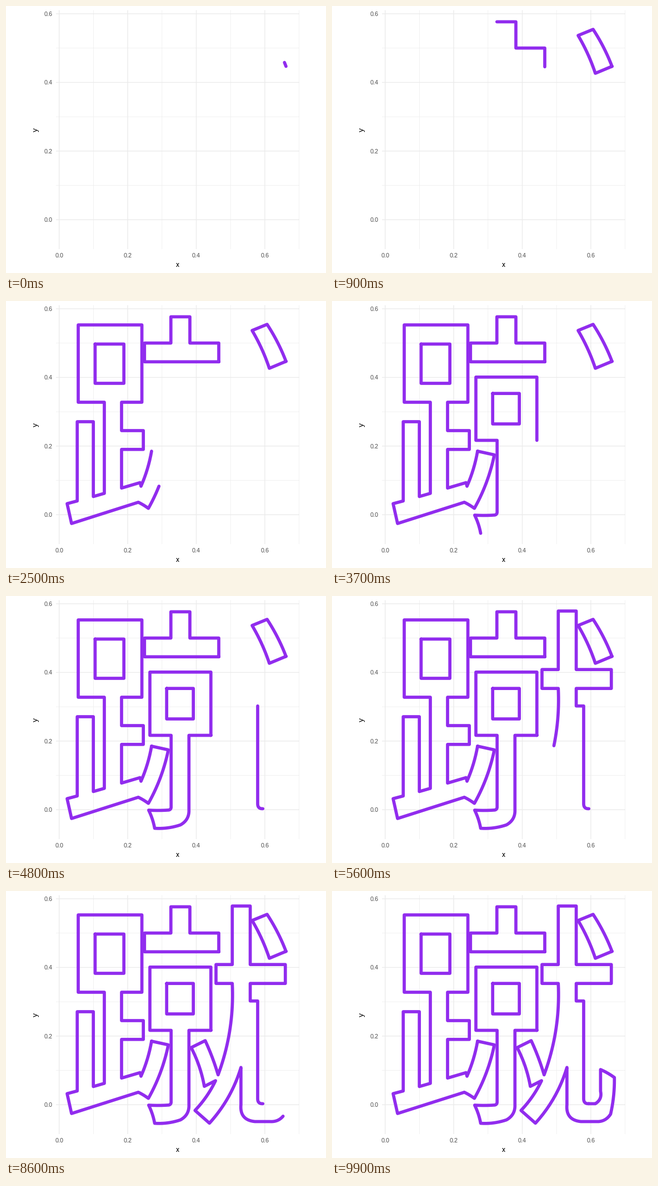
A matplotlib script that plays this animation: 576x480 px, repeating every 10000 ms.

```python
import numpy as np
import matplotlib.pyplot as plt
from matplotlib.animation import FuncAnimation

W, H, DPI = 576, 480, 96
PT = 72 / DPI                      # points per pixel
FRAMES, INTERVAL = 100, 100
POINTS_PER_FRAME = 3

X0, Y0, SCALE = 95.7, 384.2, 617   # pixel position of the data origin
LEFT, RIGHT, TOP, BOTTOM = 90, 528, 7.5, 437


class Pen:
    """Collects the points of one outline, in pixels with y down."""

    def __init__(self, x, y):
        self.points = [np.array([x, y], float)]

    def to(self, x, y):
        self.points.append(np.array([x, y], float))
        return self

    def bend(self, axis, coords):
        """Right-angled corners: each value changes the other axis."""
        for value in coords:
            p = self.points[-1].copy()
            p[axis] = value
            self.points.append(p)
            axis = 1 - axis
        return self

    def h(self, *coords):
        return self.bend(0, coords)

    def v(self, *coords):
        return self.bend(1, coords)

    def arc(self, n, bulge, x, y):
        """Parabola in n steps; positive bulge bends left of travel."""
        start, end = self.points[-1], np.array([x, y], float)
        dx, dy = end - start
        normal = np.array([dy, -dx]) / np.hypot(dx, dy)
        for t in np.arange(1, n + 1) / n:
            self.points.append(start + t * (end - start)
                               + 4 * bulge * t * (1 - t) * normal)
        return self

    def close(self):
        self.points.append(self.points[0])
        return np.array(self.points)


def box(x1, y1, x2, y2):
    return Pen(x1, y1).h(x2, y2, x1).close()


dot = (Pen(504, 108.5).arc(10, -2, 470, 42).to(443, 53)
       .arc(11, 2, 474, 121).close())

lid = Pen(383, 109.3).v(75.6, 331, 28.4, 296.8, 75.6, 249.3, 109.3).close()

foot = (Pen(262, 270).arc(8, 2, 243, 333).to(241.3, 326.5).to(208, 336.3)
        .v(266.8, 247.2, 233, 208, 182, 244.6, 43, 130, 182, 177, 345.8)
        .to(157.2, 351.5).v(217, 128.2, 359.5)
        .to(110, 364.3).to(118, 400).to(238.2, 361.8)
        .arc(4, 0.5, 256.3, 372.8).arc(14, -4, 292.2, 276.6).close())

stem = (Pen(368.8, 250.5).v(136.8, 259, 250.5, 297.2, 380)
        .arc(5, 1.2, 293, 384.8).arc(5, 0.6, 256.8, 385)
        .arc(6, 1.2, 267.6, 417.6).arc(10, -2.3, 314, 411.5)
        .arc(11, -4.9, 329.3, 384).v(250.5).close())

hook = (Pen(462.3, 382.4).arc(8, 3.4, 453, 373.5)
        .v(197.7, 439.6, 166.2, 502.8, 132.2, 439.6,
           27, 407.3, 132.2, 378, 166.2, 407.3)
        .arc(21, 8.5, 381.8, 330.5).arc(6, -1.2, 358.6, 269)
        .to(333.3, 281.5).arc(10, 2.8, 357, 351.2)
        .to(377.2, 341).arc(12, 2.6, 340.2, 394.5)
        .to(366.2, 417.4).arc(22, -6.5, 422.9, 317.2)
        .v(384).arc(15, -9.8, 448, 414.5).h(475)
        .arc(14, -4.4, 501.5, 401).arc(19, -2, 508.3, 335.3)
        .arc(4, -0.8, 483.4, 321).v(360)
        .arc(11, 4.3, 474, 382.4).close())

outlines = [dot, lid, box(160.4, 77.4, 212.2, 148), foot,
            box(289.2, 166.2, 337.2, 221), stem, hook]
starts = np.cumsum([0] + [len(o) for o in outlines[:-1]])

plt.rcParams.update({"font.family": "Liberation Sans",
                     "text.hinting": "native", "text.hinting_factor": 1})
fig = plt.figure(figsize=(W / DPI, H / DPI), dpi=DPI, facecolor="white")
ax = fig.add_axes([0, 0, 1, 1])
ax.set_xlim(0, W)
ax.set_ylim(H, 0)
ax.axis("off")


def px(v):
    return X0 + SCALE * v


def py(v):
    return Y0 - SCALE * v


# Grid every 0.1, with a heavier labelled line every 0.2
grid = dict(color="#EBEBEB", snap=False, solid_capstyle="butt", zorder=1)
tick = dict(size=11.2 * PT, color="#4D4D4D", va="baseline")
for i in range(8):
    v, major = i / 10, i % 2 == 0
    width = (1.36 if major else 0.68) * PT
    ax.plot([px(v)] * 2, [TOP, BOTTOM], lw=width, **grid)
    if i < 7:
        ax.plot([LEFT, RIGHT], [py(v)] * 2, lw=width, **grid)
    if major:
        ax.text(83.6, py(v) + 4, f"{v:.1f}", ha="right", **tick)
        ax.text(px(v), 452, f"{v:.1f}", ha="center", **tick)

title = dict(size=14 * PT, color="black", ha="center", va="baseline",
             rotation_mode="anchor")
ax.text(309.3, 468.7, "x", **title)
ax.text(56.8, 222, "y", rotation=90, **title)

lines = [ax.plot([], [], color="#912CEE", lw=5.69 * PT, snap=False,
                 solid_capstyle="round", solid_joinstyle="round",
                 zorder=3)[0] for _ in outlines]


def draw(frame):
    shown = POINTS_PER_FRAME * frame + 2
    for line, pts, start in zip(lines, outlines, starts):
        n = max(0, shown - start)
        part = pts[:n] if n > 1 else pts[:0]
        line.set_data(part[:, 0], part[:, 1])
    return lines


anim = FuncAnimation(fig, draw, frames=FRAMES, interval=INTERVAL,
                     repeat=True, repeat_delay=0)
plt.show()
```
